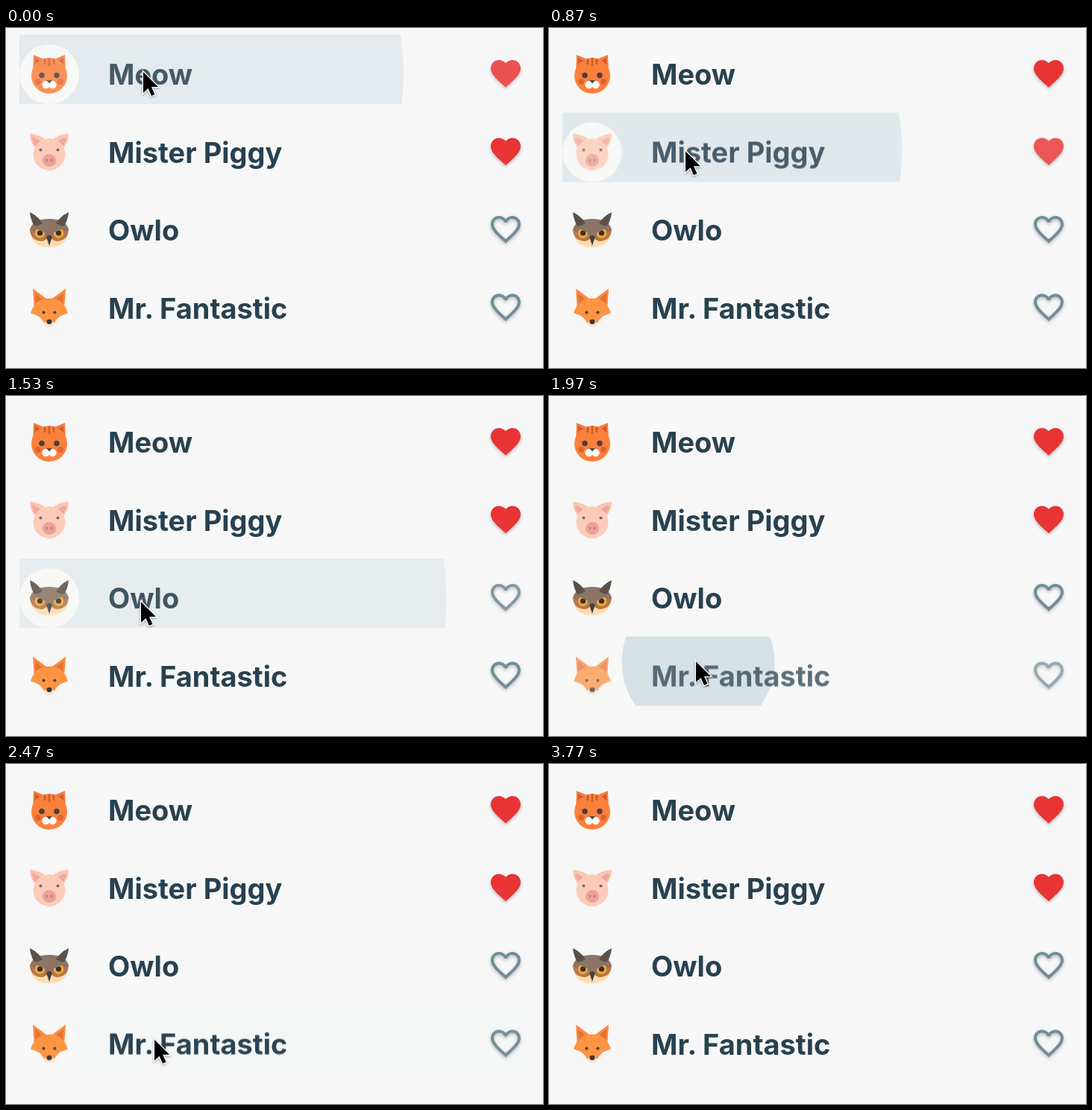
Recreate the animation shown at these times as an HTML page. Size 720x456 px, loop 3810 ms.

```html
<!DOCTYPE html>
<html lang="en">
<head>
<meta charset="utf-8">
<title>Favourite animals</title>
<style>
  html, body { margin: 0; width: 100%; height: 100%; overflow: hidden; background: #f7f7f7; }
  svg { display: block; width: 720px; height: 456px; }
  text { font: 700 38px Inter, "Open Sans", sans-serif; fill: #284150; }
  .heart { filter: drop-shadow(0 2px 2px rgba(0, 0, 0, .25)); }
  #cursor { filter: drop-shadow(0 1.5px 1.5px rgba(0, 0, 0, .35)); }
</style>
</head>
<body>
<svg viewBox="0 0 720 456">
  <defs>
    <clipPath id="rowClip"><rect x="18" width="684" height="93"/></clipPath>
    <path id="full" fill="#e93434" d="M12 21.35l-1.45-1.32C5.4 15.36 2 12.28 2 8.5 2 5.42 4.42 3 7.5 3c1.74 0 3.41.81 4.5 2.09C13.09 3.81 14.76 3 16.5 3 19.58 3 22 5.42 22 8.5c0 3.78-3.4 6.86-8.55 11.54z"/>
    <path id="empty" fill="#728c98" d="M16.5 3c-1.74 0-3.41.81-4.5 2.09C10.91 3.81 9.24 3 7.5 3 4.42 3 2 5.42 2 8.5c0 3.78 3.4 6.86 8.55 11.54L12 21.35l1.45-1.32C18.6 15.36 22 12.28 22 8.5 22 5.42 19.58 3 16.5 3zm-4.4 15.55l-.1.1-.1-.1C7.14 14.24 4 11.39 4 8.5 4 6.5 5.5 5 7.5 5c1.54 0 3.04.99 3.57 2.36h1.87C13.46 5.99 14.96 5 16.5 5c2 0 3.5 1.5 3.5 3.5 0 2.89-3.14 5.74-7.9 10.05z"/>

    <g id="cat">
      <g class="half">
        <path fill="#f57c3a" d="M-21-26L-4-19L-22-2Z"/>
        <path fill="#d25a2c" d="M-19-22L-10-17L-19-8Z"/>
      </g>
      <circle cy="2" r="24" fill="#fb813c"/>
      <path stroke="#d25a2c" stroke-width="2.6" d="M-6-21V-13M0-22V-11M6-21V-13"/>
      <g class="half">
        <circle cx="-15" cy="10" r="4" fill="#e4622f"/>
        <circle cx="-10" cy="1.5" r="3.7" fill="#46413f"/>
        <circle cx="-4.5" cy="14" r="5.2" fill="#fff"/>
      </g>
      <path fill="#544843" d="M-4 8H4L0 12.5Z"/>
    </g>

    <g id="pig">
      <g class="half">
        <path fill="#fbc5b2" d="M-26-25Q-11-23-5-17L-18-5Q-26-12-26-25Z"/>
        <path fill="#eda999" d="M-23-20Q-15-18-11-14L-18-8Q-22-12-23-20Z"/>
      </g>
      <ellipse cy="3" rx="21.5" ry="21.5" fill="#fdcbb9"/>
      <ellipse cy="11" rx="9" ry="8.5" fill="#e8a497"/>
      <g class="half">
        <circle cx="-11.5" cy="-3" r="2" fill="#7d6a66"/>
        <ellipse cx="-3.2" cy="11" rx="1.5" ry="2.4" fill="#cc7f73"/>
      </g>
    </g>

    <g id="owl">
      <path fill="#fddcb0" d="M-25 2Q-24 23 0 23Q24 23 25 2Z"/>
      <path fill="#b0784c" d="M-26-2Q-26 14-10 15Q-2 14 0 5Q2 14 10 15Q26 14 26-2Z"/>
      <path fill="#8d7565" d="M-26 0Q-23-15 0-15Q23-15 26 0L0 9Z"/>
      <g class="half">
        <path fill="#5b514c" d="M-26-24Q-15-19-9-9L-19-4Q-25-12-26-24Z"/>
        <circle cx="-12.5" cy="4" r="6.8" fill="#f9a632"/>
        <circle cx="-12.5" cy="4" r="3.6" fill="#33302f"/>
        <path fill="#8d7565" d="M-25-5L-3 5L-6-6Z"/>
      </g>
      <path fill="#45403e" d="M-4 9Q0 5 4 9L0 21Z"/>
    </g>

    <g id="fox">
      <g class="half">
        <path fill="#fa8840" d="M-22-26L-2-11L-20 3Z"/>
        <path fill="#e9702f" d="M-19-20L-9-11L-18-4Z"/>
      </g>
      <ellipse cy="20" rx="7" ry="5.6" fill="#fde3cc"/>
      <path fill="#fd9443" d="M-25 7Q-19-13 0-13Q19-13 25 7Q11 10 7 20Q0 14-7 20Q-11 10-25 7Z"/>
      <g class="half"><circle cx="-7.5" cy="6" r="2.1" fill="#4a4240"/></g>
      <ellipse cy="18.5" rx="3.6" ry="3.2" fill="#3b3635"/>
    </g>
  </defs>
  <g id="rows"></g>
  <path id="cursor" d="M0 0V28L6.5 22L11 32L15.5 30L11 20H20Z" stroke="#fff" stroke-width="2.6" paint-order="stroke"/>
</svg>
<script>
const LOOP = 3810, RIPPLE_MS = 800, ROW_TOP = 9, ROW_STEP = 104.5;

const animals = [
  { name: 'Meow', icon: 'cat', heart: 'full', click: -258, x: 187, y: 52 },
  { name: 'Mister Piggy', icon: 'pig', heart: 'full', click: 640, x: 184, y: 51 },
  { name: 'Owlo', icon: 'owl', heart: 'empty', click: 1240, x: 184, y: 57 },
  { name: 'Mr. Fantastic', icon: 'fox', heart: 'empty', click: 1896, x: 200, y: 34 },
];

// Cursor stops: time, x, y
const cursorPath = [
  [0, 184, 59], [250, 184, 59], [600, 183, 164], [850, 183, 164], [1200, 181, 276],
  [1560, 181, 276], [1880, 197, 356], [2250, 197, 356], [2600, 200, 376],
];
const CURSOR_HIDE = 2800;

// Complete the symmetric faces with mirrored halves
for (const half of document.querySelectorAll('.half')) {
  const mirrored = half.cloneNode(true);
  mirrored.setAttribute('transform', 'scale(-1 1)');
  half.after(mirrored);
}

const rowsGroup = document.getElementById('rows');
rowsGroup.innerHTML = animals.map((a, i) => `
  <g transform="translate(0 ${ROW_TOP + i * ROW_STEP})">
    <g class="effect" clip-path="url(#rowClip)">
      <circle class="ripple" cx="${a.x}" cy="${a.y}" fill="#2c6e90"/>
      <circle cx="58" cy="53" r="40" fill="#f8f8f6"/>
    </g>
    <g class="content">
      <use href="#${a.icon}" x="58" y="53"/>
      <text x="137" y="67">${a.name}</text>
      <g class="heart"><use href="#${a.heart}" transform="translate(646 28) scale(2)"/></g>
    </g>
  </g>`).join('');

const rows = [...rowsGroup.children].map((row, i) => ({
  click: animals[i].click,
  effect: row.querySelector('.effect'),
  ripple: row.querySelector('.ripple'),
  content: row.querySelector('.content'),
}));
const cursor = document.getElementById('cursor');

// cubic-bezier(.4, 0, .2, 1), solved by bisection
function standardEase(x) {
  let low = 0, high = 1;
  for (let i = 0; i < 20; i++) {
    const u = (low + high) / 2, v = 1 - u;
    if (1.2 * v * v * u + 0.6 * v * u * u + u ** 3 < x) low = u; else high = u;
  }
  return low * low * (3 - 2 * low);
}

function drawRow(row, t) {
  const p = (t - row.click) / RIPPLE_MS;
  const active = p >= 0 && p < 1;
  const spread = active ? standardEase(p) : 1;
  row.effect.style.display = active ? '' : 'none';
  row.content.style.opacity = 1 - 0.26 * (1 - spread);
  row.ripple.setAttribute('r', 89 + 595 * spread);
  row.ripple.style.opacity = 0.165 * (1 - spread);
}

function cursorAt(t) {
  const next = cursorPath.findIndex(stop => stop[0] > t);
  if (next < 0) return cursorPath.at(-1).slice(1);
  const [t0, x0, y0] = cursorPath[next - 1], [t1, x1, y1] = cursorPath[next];
  const p = (t - t0) / (t1 - t0), ease = p * p * (3 - 2 * p);
  return [x0 + (x1 - x0) * ease, y0 + (y1 - y0) * ease];
}

function draw(now) {
  const t = now % LOOP;
  rows.forEach(row => drawRow(row, t));
  cursor.setAttribute('transform', `translate(${cursorAt(t)})`);
  cursor.style.display = t < CURSOR_HIDE ? '' : 'none';
}

const start = performance.now();
function tick() {
  draw(performance.now() - start);
  requestAnimationFrame(tick);
}
tick();
</script>
</body>
</html>
```
